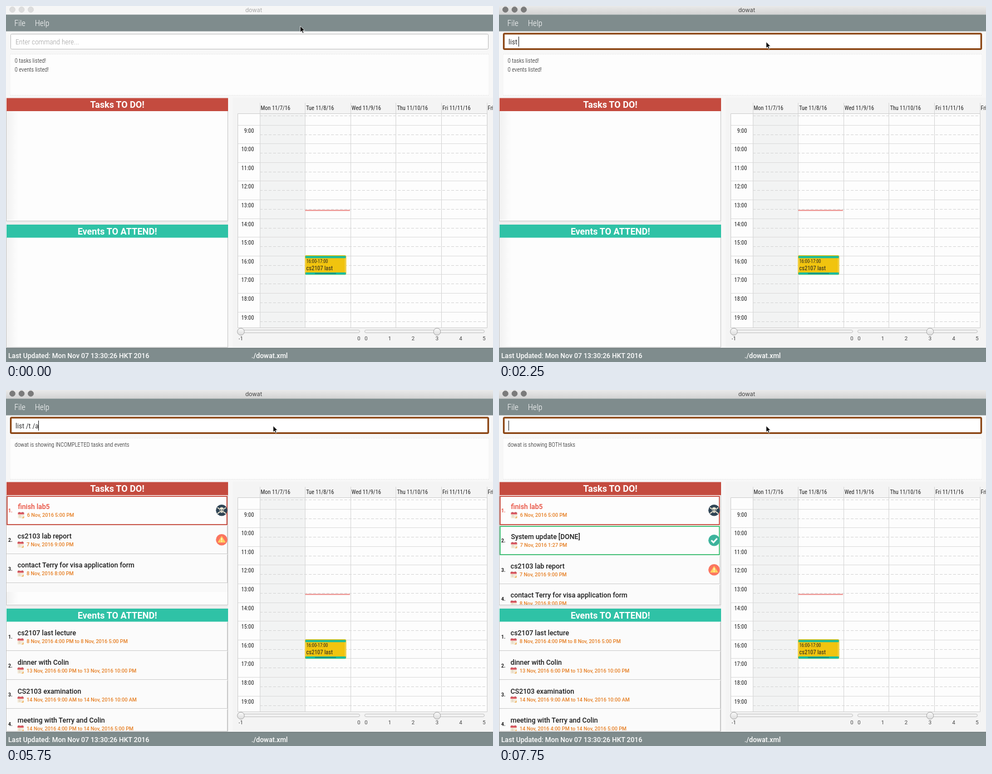
Animation of 875 by 640 pixels, one loop 8000 ms. Source, as an HTML page:

```html
<!DOCTYPE html>
<html lang="en">
<head>
<meta charset="utf-8">
<title>dowat</title>
<style>
html, body { margin: 0; width: 100%; height: 100%; overflow: hidden; background: #f7f7f7; }
svg { display: block; width: 875px; height: 640px; }
text { font-family: Roboto, sans-serif; white-space: pre; }
.narrow { font-family: "Roboto Condensed", Roboto, sans-serif; font-stretch: condensed; letter-spacing: var(--track, 0); }
.light { font-weight: 300; }
.medium { font-weight: 500; }
.bold { font-weight: 700; }
.mid { text-anchor: middle; }
.end { text-anchor: end; }
.title { font-family: Inter, sans-serif; }
</style>
</head>
<body>
<svg id="stage" viewBox="0 0 875 640" xmlns="http://www.w3.org/2000/svg">
  <defs>
    <linearGradient id="bar" x2="0" y2="1"><stop stop-color="#e9e9e9"/><stop offset="1" stop-color="#d2d2d2"/></linearGradient>
    <linearGradient id="shade"><stop stop-color="#000" stop-opacity=".05"/><stop offset="1" stop-color="#000" stop-opacity="0"/></linearGradient>
    <linearGradient id="knob" x2="0" y2="1"><stop stop-color="#fafafa"/><stop offset="1" stop-color="#dcdcdc"/></linearGradient>
    <clipPath id="taskClip"><path d="M0 189H399V386H0Z"/></clipPath>
    <clipPath id="eventClip"><path d="M0 417H399V613H0Z"/></clipPath>
    <g id="calendar">
      <rect y="1" width="11" height="10.5" rx="1" fill="#f3ead8"/>
      <path d="M0 4.5V2Q0 1 1 1H10Q11 1 11 2V4.5Z" fill="#dd5560"/>
      <path d="M2.5 0V2.5M8.5 0V2.5" stroke="#8c5a5a"/>
      <path d="M2 6.5H5M2 9H5" stroke="#d3c8b4"/>
      <path d="M7 11.5 11 7.5V10.5Q11 11.5 10 11.5Z" fill="#f0b35c"/>
    </g>
    <g id="skull">
      <circle r="10.3" fill="#2f4454"/>
      <path d="M-7 -4.5 7 5.5M7 -4.5-7 5.5" stroke="#f1ead6" stroke-width="1.7" stroke-linecap="round"/>
      <path d="M-4.4 -1.2A4.4 4.6 0 0 1 4.4 -1.2Q4.4 1.6 2.2 2.4V4.6H-2.2V2.4Q-4.4 1.6 -4.4 -1.2Z" fill="#f1ead6" stroke="#2f4454" stroke-width=".6"/>
      <g fill="#2f4454"><circle cx="-1.9" cy="-.6" r="1.2"/><circle cx="1.9" cy="-.6" r="1.2"/><path d="M0 .9 .7 2.2H-.7Z"/></g>
    </g>
    <g id="warning">
      <circle r="10.3" fill="#fb7560"/>
      <path d="M0 -5.8 6.2 4.2H-6.2Z" fill="#ffd35e" stroke="#ffd35e" stroke-width="1.4" stroke-linejoin="round"/>
      <path d="M0 -3.2V1.2M0 2.6V4" stroke="#fff" stroke-width="1.4"/>
    </g>
    <g id="check">
      <circle r="10.3" fill="#3cb39c"/>
      <path d="M-5 0 -1.2 3.7 5.4 -3.4" fill="none" stroke="#fff" stroke-width="2.8"/>
    </g>
  </defs>
  <g id="window"></g>
  <g id="field">
    <rect id="box" fill="#fff"/>
    <text id="prompt" class="narrow light" x="17" y="69" font-size="13" fill="#a0a0a0">Enter command here...</text>
    <text id="typed" class="narrow" x="17" y="69" font-size="13" fill="#333" xml:space="preserve"></text>
    <rect id="caret" y="55" width="1" height="18" fill="#222"/>
  </g>
  <g id="listed"></g>
  <g id="incomplete"></g>
  <g id="both"></g>
  <g id="events" clip-path="url(#eventClip)"></g>
  <path id="pointer" d="M0 0V11.2L2.6 8.9 4.4 13 6.3 12.2 4.5 8.1H8Z" fill="#000" stroke="#fff" stroke-width=".8"/>
</svg>
<script>
const $ = id => document.getElementById(id);
const set = (node, attrs) => { for (const k in attrs) node.setAttribute(k, attrs[k]); };
const show = (id, on) => set($(id), { visibility: on ? 'visible' : 'hidden' });

const label = (str, x, y, size, cls = '', fill = '#222') =>
  `<text x="${x}" y="${y}" font-size="${size}" class="${cls}" fill="${fill}">${str}</text>`;
const rect = (x, y, w, h, fill, more = '') =>
  `<rect x="${x}" y="${y}" width="${w}" height="${h}" fill="${fill}" ${more}/>`;
const line = (d, stroke, more = '') => `<path d="${d}" fill="none" stroke="${stroke}" ${more}/>`;
const repeat = (n, make) => Array.from({ length: n }, (_, i) => make(i)).join('');

function titleBar() {
  return rect(0, 0, 875, 15.5, '#f6f6f6', 'id="titleBar"') +
    `<g id="lights">${repeat(3, i => `<circle cx="${11.5 + 16.5 * i}" cy="6.5" r="5"/>`)}</g>` +
    `<text id="title" class="title mid" x="445" y="10.5" font-size="10.4">dowat</text>`;
}

function panel(top, bottom, color, heading) {
  return rect(1, top + 23, 398, bottom - top - 23, '#fdfdfd') +
    rect(0, top + 24, 22, Math.min(bottom - top - 24, 195), 'url(#shade)') +
    line(`M0.5 ${top + 23}V${bottom + .5}H398.5V${top + 23}`, '#c6c6c6') +
    rect(1, top, 398, 23.5, color) +
    label(heading, 200, top + 17.5, 16.2, 'bold mid', '#fff');
}

function slider(left, right, thumb, marks) {
  return rect(left, 582.5, right - left, 5, '#f1f1f1', 'rx="2.5" stroke="#c4c4c4"') +
    `<circle cx="${thumb}" cy="585.5" r="6.3" fill="url(#knob)" stroke="#a9a9a9"/>` +
    marks.map(([str, x]) => label(str, x, 601, 9.6, 'mid', '#444')).join('');
}

function appointment() {
  return rect(537, 448, 74.3, 35.3, '#f1c40f', 'rx="2.5"') +
    line('M538.5 453V479M609.5 453V479', '#f0dc8c', 'stroke-width=".8"') +
    rect(538, 449.3, 72.5, 4, '#1abc9c') + rect(538, 479, 72.5, 4, '#1abc9c') +
    rect(555, 479.8, 38, 2, '#16907a') +
    label('16:00-17:00', 539.7, 461.5, 8.3, 'narrow') +
    label('cs2107 last', 539.5, 475, 10.4, 'narrow');
}

function calendar() {
  const hour = 33.6, day = 81.6, left = 456;
  const days = ['Mon 11/7/16', 'Tue 11/8/16', 'Wed 11/9/16', 'Thu 11/10/16', 'Fri 11/11/16', 'Fri 11/12/16'];
  return rect(407, 165, 468, 449, '#f4f4f4') +
    rect(416, 193.5, 448, 385, '#fdfdfd') +
    rect(left, 193.5, day, 385, '#f2f3f3') +
    repeat(12, i => line(`M${left} ${Math.round(197 + hour * i) + .5}H864`, '#d6d6d6', 'stroke-dasharray="5 3"')) +
    repeat(11, i => line(`M416 ${Math.round(213.6 + hour * i) + .5}H864`, '#dcdcdc') +
      label(`${9 + i}:00`, 445.5, 227.5 + hour * i, 10.3, 'narrow end')) +
    days.map((d, i) => line(`M${Math.floor(left + day * i) + .5} 174V578`, '#d6d6d6') +
      label(d, left + 1.6 + day * i, 186.5, 10.3, 'narrow')).join('') +
    line('M416.5 193.5H864.5V578.5H416.5Z', '#cfcfcf') +
    rect(537.5, 366.6, 80.5, 1.7, '#e87b78') +
    appointment() +
    slider(422, 635.5, 422, [['-1', 422], ['0', 634]]) +
    slider(644.5, 859.5, 774.5, [['0', 647], ['1', 689.5], ['2', 731.5], ['3', 774.5], ['4', 817], ['5', 859]]);
}

$('window').innerHTML =
  rect(0, 0, 875, 640, '#f7f7f7') + titleBar() +
  rect(0, 15.5, 875, 30, '#7f8c8d') +
  label('File', 15, 36.3, 14.6, 'narrow light', '#fff') +
  label('Help', 52, 36.3, 14.6, 'narrow light', '#fff') +
  rect(8, 87, 859, 73, '#fdfdfd') +
  line('M8 86.5H867M8 160.5H867', '#dedede', 'stroke-dasharray="1 2"') +
  rect(0, 387, 399, 6, '#eeeeee') +
  panel(165.5, 386, '#c44b3f', 'Tasks TO DO!') +
  panel(393, 613, '#2fc2a6', 'Events TO ATTEND!') +
  calendar() +
  rect(0, 614.5, 875, 25.5, '#7f8c8d') + line('M0 615.5H875', '#667071') +
  label('Last Updated: Mon Nov 07 13:30:26 HKT 2016', 4, 632.5, 12.22, 'medium', '#fff') +
  label('./dowat.xml', 441, 632.5, 12.22, 'medium', '#fff');

// One list entry; y is the middle of its name line.
function entry(number, y, name, date, { icon, border, color = '#1c1c1c', right = 398 } = {}) {
  const frame = border
    ? rect(2, y - 18.8, right - 3, 50.8, '#fdfdfd', `stroke="${border}" stroke-width="1.6"`)
    : rect(1, y - 20, right - 1, 51, '#fbfbfb') +
      line(`M1 ${Math.round(y + 31) + .5}H${right}M${right - .5} ${y - 19}V${y + 31}`, '#cecece');
  const x = border ? 21.5 : 20.7;
  return frame +
    label(number + '.', 4, y + 10, 8.6, 'bold', color) +
    label(name, x, y + 4.4, 12.3, 'medium', color) +
    `<use href="#calendar" x="${x}" y="${y + 9}"/>` +
    label(date, x + 16.3, y + 18.4, 9.17, 'medium', '#e67e22') +
    (icon ? `<use href="#${icon}" x="${right - 10.5}" y="${y + 6.3}"/>` : '');
}

const message = (...lines) =>
  lines.map((str, i) => label(str, 15.8, 102 + 15.7 * i, 10.5, 'narrow light', '#111')).join('');
const tasks = content => `<g clip-path="url(#taskClip)">${content}</g>`;
const overdue = right => entry(1, 210, 'finish lab5', '6 Nov, 2016 5:00 PM',
  { icon: 'skull', border: '#c0392b', color: '#e74c3c', right });
const report = (n, y, right) => entry(n, y, 'cs2103 lab report', '7 Nov, 2016 9:00 PM', { icon: 'warning', right });
const visa = (n, y, right) => entry(n, y, 'contact Terry for visa application form', '8 Nov, 2016 8:00 PM', { right });

$('listed').innerHTML = message('0 tasks listed!', '0 events listed!');
$('incomplete').innerHTML = message('dowat is showing INCOMPLETED tasks and events') +
  tasks(rect(1, 347, 397, 16, '#f9f9f9') + overdue(398) + report(2, 263, 398) + visa(3, 315, 398));
$('both').innerHTML = message('dowat is showing BOTH tasks') +
  tasks(overdue(397) +
    entry(2, 264, 'System update [DONE]', '7 Nov, 2016 1:27 PM', { icon: 'check', border: '#2ab765', right: 397 }) +
    report(3, 317, 397) + visa(4, 369, 397));
$('events').innerHTML = [
  ['cs2107 last lecture', '8 Nov, 2016 4:00 PM to 8 Nov, 2016 5:00 PM'],
  ['dinner with Colin', '13 Nov, 2016 6:00 PM to 13 Nov, 2016 10:00 PM'],
  ['CS2103 examination', '14 Nov, 2016 9:00 AM to 14 Nov, 2016 10:00 AM'],
  ['meeting with Terry and Colin', '14 Nov, 2016 4:00 PM to 14 Nov, 2016 5:00 PM']
].map(([name, date], i) => entry(i + 1, 437 + 52.2 * i, name, date)).join('');

// Tighten the tracking when no condensed face is installed.
const promptWidth = () => $('prompt').getComputedTextLength();
const condensed = promptWidth();
$('prompt').classList.remove('narrow');
if (condensed > promptWidth() * .95) $('stage').style.setProperty('--track', '-.065em');
$('prompt').classList.add('narrow');

const LOOP = 8000;
const typing = [[0, ''], [1250, 'l'], [1500, 'lis'], [1750, 'list'], [2250, 'list '], [2750, ''],
  [3750, 'li'], [4000, 'lis'], [4250, 'list '], [4500, 'list /'], [5000, 'list /t'], [5250, 'list /'],
  [5500, 'list /t '], [5750, 'list /t /a'], [6250, ''], [7500, 'l'], [7750, '']];
const pointerPath = [[0, [528.7, 36]], [250, [485.7, 63]], [500, [480, 64.5]]];
const at = (steps, t) => steps.filter(([start]) => start <= t).pop()[1];
const between = (t, a, b) => t >= a && t < b;

function render(t) {
  const active = t >= 750, focused = t >= 1000;
  set($('titleBar'), { fill: active ? 'url(#bar)' : '#f6f6f6' });
  set($('lights'), { fill: active ? '#7b7b7b' : '#dddddd', stroke: active ? '#6b6b6b' : '#cfcfcf', 'stroke-width': .6 });
  set($('title'), { fill: active ? '#444' : '#a8a8a8' });
  set($('box'), focused
    ? { x: 8.6, y: 49.8, width: 857.8, height: 27.8, rx: 1.5, stroke: '#8b4513', 'stroke-width': 3 }
    : { x: 8.5, y: 50.5, width: 858, height: 27, rx: 2, stroke: '#bdbdbd', 'stroke-width': 1 });
  show('prompt', !focused);
  $('typed').textContent = at(typing, t);
  set($('caret'), { x: Math.round(16.6 + $('typed').getComputedTextLength()) });
  show('caret', focused && !between(t, 3000, 3500) && !between(t, 6500, 7000));
  show('listed', t < 2750);
  show('incomplete', between(t, 2750, 6250));
  show('both', t >= 6250);
  show('events', t >= 2750);
  set($('pointer'), { transform: `translate(${at(pointerPath, t)})` });
}

const start = performance.now();
function tick() {
  render((performance.now() - start) % LOOP);
  requestAnimationFrame(tick);
}
tick();
</script>
</body>
</html>
```
